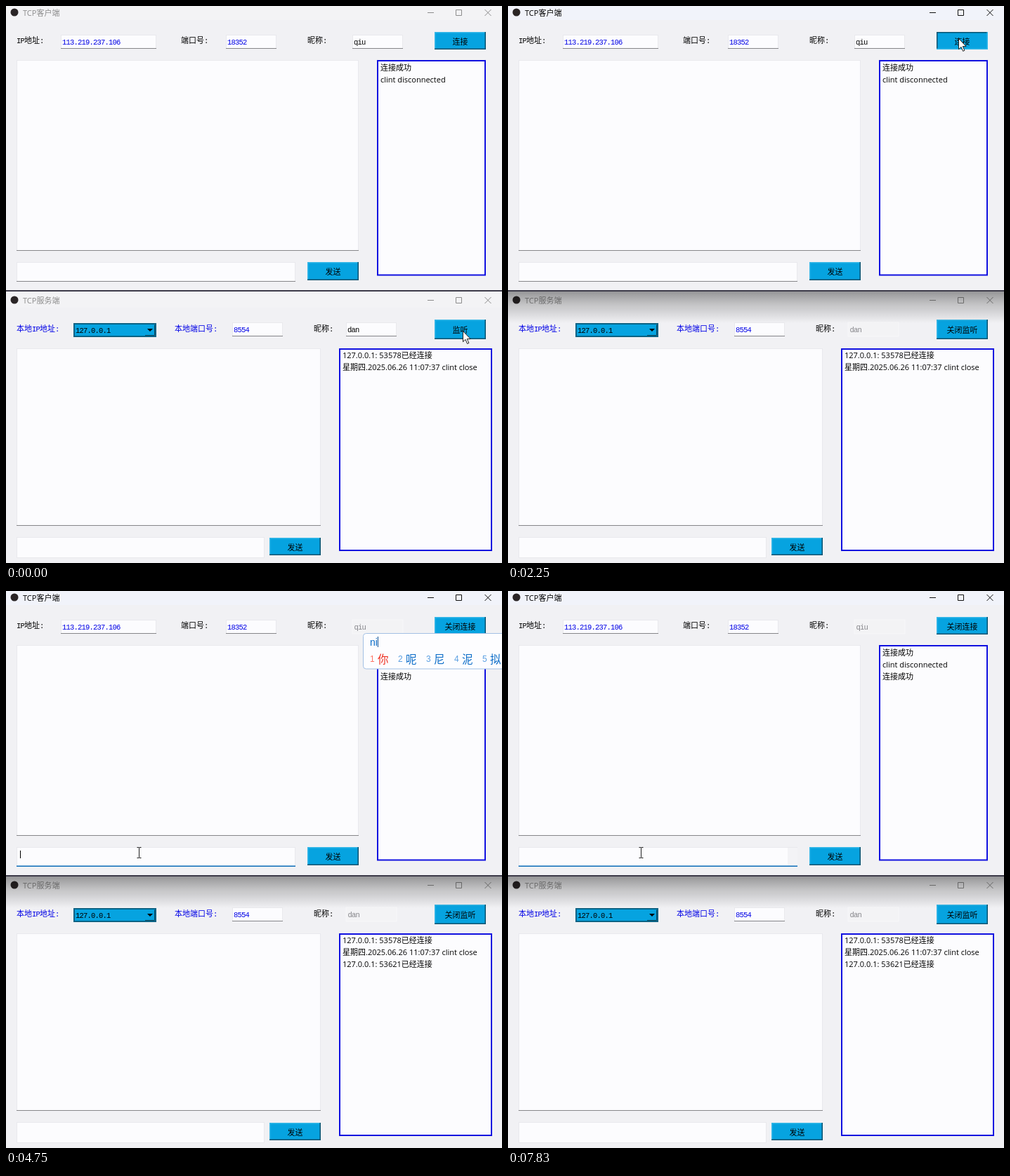
Write an HTML page that moves like this. It is 706x794 px and loops after 8 s.

```html
<!DOCTYPE html>
<html lang="zh-CN">
<head>
<meta charset="utf-8">
<title>TCP</title>
<style>
  html, body { margin: 0; width: 100%; height: 100%; overflow: hidden; background: #f1f1f4; }
  svg { display: block; user-select: none; }
  text { white-space: pre; }
  .ui { font: 11px "Open Sans", "Noto Sans CJK SC", "Noto Sans CJK", sans-serif; }
  .cjk { font: 11px "Noto Sans CJK SC", "Noto Sans CJK", sans-serif; }
  .mono { font: 10.5px "Liberation Mono", monospace; letter-spacing: -0.8px; }
  .pinyin { font: 14px "Liberation Sans", sans-serif; }
  .num { font: 12px "Liberation Sans", sans-serif; }
  .cand { font: 15.5px "Noto Sans CJK SC", "Noto Sans CJK", sans-serif; }
</style>
</head>
<body>
<svg id="stage" width="706" height="794" viewBox="0 0 706 794">
  <defs>
    <linearGradient id="down" x1="0" y1="0" x2="0" y2="1">
      <stop offset="0" stop-opacity=".38"/>
      <stop offset=".4" stop-opacity=".2"/>
      <stop offset="1" stop-opacity="0"/>
    </linearGradient>
    <linearGradient id="up" x1="0" y1="1" x2="0" y2="0">
      <stop offset="0" stop-opacity=".16"/>
      <stop offset="1" stop-opacity="0"/>
    </linearGradient>
  </defs>
</svg>
<script>
const LOOP = 8000;
const BLUE = '#0000e6', INK = '#000', GREY = '#8c8c8c', PAPER = '#fcfcfe', CYAN = '#06a3e0';
const stage = document.getElementById('stage');

function el(tag, attrs, parent = stage) {
  const node = document.createElementNS('http://www.w3.org/2000/svg', tag);
  for (const k in attrs) node.setAttribute(k, attrs[k]);
  return parent.appendChild(node);
}
const rect = (x, y, width, height, fill, more, parent) =>
  el('rect', { x, y, width, height, fill, ...more }, parent);
const path = (d, stroke, more, parent) =>
  el('path', { d, stroke, fill: 'none', ...more }, parent);
function text(x, y, str, cls, fill = INK, parent, more) {
  const node = el('text', { x, y, class: cls, fill, ...more }, parent);
  node.textContent = str;
  return node;
}
const show = (node, on) => node.setAttribute('visibility', on ? 'visible' : 'hidden');

// Chinese runs and half-width Latin runs in one label
function label(x, y, str, fill) {
  const node = el('text', { x, y, fill });
  for (const run of str.match(/[\x00-\x7f]+|[^\x00-\x7f]+/g))
    el('tspan', { class: run.charCodeAt(0) < 128 ? 'mono' : 'cjk' }, node).textContent = run;
}

function titleBar(y, name) {
  const bar = rect(0, y, 706, 20, '#f3f3f5');
  el('circle', { cx: 12, cy: y + 9, r: 5.5, fill: '#2a2526' });
  const title = text(24, y + 14, name, 'ui');
  const icons = path(`M600 ${y + 9.5}h9M640.5 ${y + 5.5}h8v8h-8zM681.5 ${y + 5}l9 9m0-9l-9 9`, INK);
  return active => {
    bar.setAttribute('fill', active ? '#f1f3fa' : '#f3f3f5');
    title.setAttribute('fill', active ? INK : GREY);
    icons.setAttribute('stroke', active ? '#111' : GREY);
  };
}

function area(x, y, w, h, lined = true) {
  rect(x + .5, y + .5, w - 1, h - 1, PAPER, { stroke: '#e9e9ed' });
  return lined && path(`M${x} ${y + h - .5}h${w}`, '#868689');
}

function field(x, y, w, value, fill) {
  const line = area(x, y, w, 20);
  const entry = text(x + 2, y + 14, value, 'mono', fill);
  const cover = rect(x, y, w, 20, '#f3f3f5', { stroke: '#f7f7f9' });
  stage.insertBefore(cover, entry);
  return off => {
    show(cover, off);
    show(line, !off);
    entry.setAttribute('x', x + (off ? 2.5 : 2));
    entry.setAttribute('fill', off ? '#85858a' : fill);
  };
}

function button(x, y, w, h, str) {
  rect(x, y, w, h, CYAN);
  const lit = path(`M${x + .75} ${y + h}v${.75 - h}h${w - .75}`, '', { 'stroke-width': 1.5 });
  const dark = path(`M${x} ${y + h - .75}h${w - .75}v${.75 - h}`, '', { 'stroke-width': 1.5 });
  const caption = text(x + w / 2, y + h / 2 + 5, str, 'cjk', INK, stage, { 'text-anchor': 'middle' });
  return (pressed, str) => {
    lit.setAttribute('stroke', pressed ? '#07526f' : '#35b7e8');
    dark.setAttribute('stroke', pressed ? '#35b7e8' : '#07526f');
    if (str) caption.textContent = str;
  };
}

const listBox = (x, y, w, h) => rect(x + 1, y + 1, w - 2, h - 2, PAPER, { stroke: '#1010e0', 'stroke-width': 2 });
const row = (x, y, i, str) => text(x, y + 17 * i, str, 'ui');

// Client window
const clientTitle = titleBar(0, 'TCP客户端');
label(15, 53, 'IP地址:');
field(78, 41, 136, '113.219.237.106', BLUE)(false);
label(249, 53, '端口号:');
field(313, 41, 72, '18352', BLUE)(false);
label(429, 53, '昵称:');
const clientName = field(493, 41, 72, 'qiu', INK);
const connect = button(610, 37, 73, 25, '连接');
area(15, 77, 487, 272);
const inputLine = area(15, 365, 397, 28);
const focusLine = path('M15 392.25h397', '#0a6cb8', { 'stroke-width': 1.5 });
const scroller = rect(398, 366, 14, 25, '#f3f3f6');
const typed = text(19.5, 379.5, '您好', 'cjk');
const caret = rect(20, 370, 1, 11, INK);
button(429, 365, 73, 26, '发送')(false);
listBox(528, 77, 155, 307.5);
const hover = rect(530, 96, 151, 17, '#e2f3fd');
row(533, 92, 0, '连接成功');
row(533, 92, 1, 'clint disconnected');
const clientRow = row(533, 92, 2, '连接成功');

// Server window
rect(0, 407, 706, 387, '#f1f1f4');
const serverTitle = titleBar(410, 'TCP服务端');
label(15, 463.5, '本地IP地址:', BLUE);
rect(97, 453, 116, 18, CYAN, { stroke: '#0a6284', 'stroke-width': 2 });
path('M198 469.5h13.5v-15', '#07485f');
el('path', { d: 'M201 460h8l-4 4z', fill: INK });
text(99, 465.5, '127.0.0.1', 'mono');
label(240, 463.5, '本地端口号:', BLUE);
field(322, 451, 72, '8554', BLUE)(false);
label(438, 463.5, '昵称:');
const serverName = field(484, 451, 72, 'dan', INK);
const listen = button(610, 447, 73, 28, '监听');
area(15, 488, 433, 253);
area(15, 757, 353, 30, false);
button(375, 758, 73, 25, '发送')(false);
listBox(474, 488, 218, 289);
row(479, 502, 0, '127.0.0.1: 53578已经连接');
row(479, 502, 1, '星期四.2025.06.26 11:07:37 clint close');
const serverRow = row(479, 502, 2, '127.0.0.1: 53621已经连接');

const shadowDown = rect(0, 407, 706, 45, 'url(#down)');
const shadowUp = rect(0, 380, 706, 25, 'url(#up)');
rect(0, 405, 706, 2, '#3c3a48');

// Input method popup
const popup = el('g', {});
rect(508.5, 60.5, 230, 50.5, '#fdfdff', { rx: 4, stroke: '#a3c0e4' }, popup);
const pinyin = text(518, 77.5, '', 'pinyin', '#0a6cc8', popup);
const bar = rect(0, 65, 1, 15, '#0a4c90', {}, popup);
const choices = el('g', {}, popup);

function fillPopup(str, words) {
  if (pinyin.textContent === str) return;
  pinyin.textContent = str;
  choices.textContent = '';
  let x = 518;
  words.split(' ').forEach((word, i) => {
    text(x, 101, i + 1, 'num', i ? '#5b9fe2' : '#ff7465', choices);
    text(x + 11, 102.5, word, 'cand', i ? '#0a6cc8' : '#ee2f20', choices);
    x += 24.5 + 15.5 * word.length;
  });
}

// Mouse pointers
const arrow = el('path', {
  d: 'M.5 .5v15.2l3.5-3.3 2.6 6 2.3-1-2.6-5.8h4.8z', fill: '#fff', stroke: '#222', 'stroke-width': 1
});
const beam = path('M-3 -7.5h2.5l.5 .5 .5-.5h2.5M0 -7v14M-3 7.5h2.5l.5-.5 .5 .5h2.5', '#222');

// [time, x, y]
const pointer = [
  [0, 650, 463], [1000, 649, 440], [1083, 640, 300], [1167, 627, 108], [1250, 625, 88],
  [1333, 631, 66], [1417, 636, 46], [1500, 638, 33], [1670, 640, 40], [1750, 641, 46],
  [2750, 590, 170], [2833, 474, 370], [2920, 367, 516], [3000, 310, 550], [3083, 266, 538],
  [3167, 232, 496], [3250, 206, 444], [3333, 190, 402], [3420, 185, 374], [3920, 185, 373], [4080, 189, 373]
];
const typing = [
  [0, ''], [4670, 'n', '你 那 年 能 呢'], [4750, 'ni', '你 呢 尼 泥 拟'], [4920, 'nin', '您 恁 拰 囜 年'],
  [5080, "nin'h", '您好 您 恁 拰 囜'], [5167, "nin'ha", '您好 您 恁 拰 囜'],
  [5250, "nin'hao", '您好 您 恁 拰 囜'], [5500, '']
];
const blink = [0, 3580, 4080, 4670, 5080, 5670, 6170, 6250, 6750, 7330, 7830];
const stepAt = (table, t) => table.findLast(s => s[0] <= t);

function render(t) {
  const within = (a, b = LOOP) => t >= a && t < b;
  const linked = within(2420), sent = within(6250);

  clientTitle(within(2250));
  serverTitle(within(500, 2250));
  show(shadowUp, within(500, 2250));
  show(shadowDown, within(2250));

  listen(within(500, 670), within(670) ? '关闭监听' : '监听');
  serverName(within(670));
  connect(within(2250, 2420), linked ? '关闭连接' : '连接');
  clientName(within(2333));
  show(clientRow, within(2333));
  show(serverRow, within(2333));
  show(hover, within(1167, 1333));

  const focused = within(3580);
  show(focusLine, focused);
  show(inputLine, !focused);
  show(scroller, sent);
  show(typed, within(5500, 6250));
  show(caret, blink.filter(b => b <= t).length % 2 === 0);
  caret.setAttribute('x', within(5500, 6250) ? 41 : 20);
  caret.setAttribute('y', sent ? 366 : 370);

  const [, str, words] = stepAt(typing, t);
  show(popup, str);
  if (str) {
    fillPopup(str, words);
    bar.setAttribute('x', 518 + pinyin.getComputedTextLength());
  }

  const [, x, y] = stepAt(pointer, t);
  const overInput = within(3420);
  show(arrow, !overInput);
  show(beam, overInput);
  (overInput ? beam : arrow).setAttribute('transform', `translate(${overInput ? x + .5 : x} ${y})`);
}

function tick() {
  render(performance.now() % LOOP);
  requestAnimationFrame(tick);
}
tick();
</script>
</body>
</html>
```
